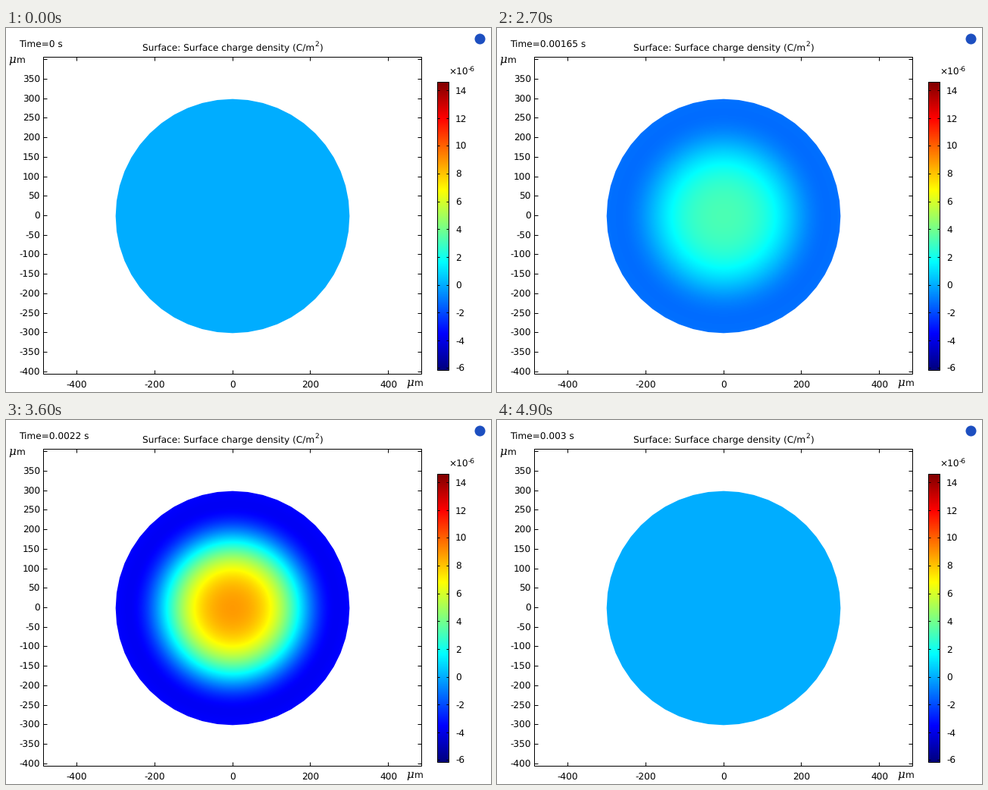
Animation of 640x480 px, one loop 5000 ms. Source, as a matplotlib script:

```python
import numpy as np
import matplotlib.pyplot as plt
from matplotlib.animation import FuncAnimation
from matplotlib.colors import LinearSegmentedColormap
from matplotlib.patches import Circle, Polygon, Rectangle

plt.rcParams.update({
    "toolbar": "None",
    "font.family": "DejaVu Sans",
    "text.hinting": "no_hinting",
})

W, H, DPI = 640, 480, 100
FRAMES, INTERVAL = 50, 100
PT = 72 / DPI

AXIS_X, AXIS_Y, SCALE = 299, 247.5, 0.5145   # origin and pixels per micrometre
DISC_X, DISC_Y, RADIUS = 299, 248, 300 * SCALE
LEFT, RIGHT, TOP, BOTTOM = 49.5, 548.5, 38.5, 456.5
BAR = (569.5, 71.5, 584.5, 451.5)
V_MIN, V_MAX = -6.14, 14.6

rainbow = LinearSegmentedColormap.from_list("rainbow", [
    (0, (0, 0, 0.5)), (0.125, (0, 0, 1)), (0.375, (0, 1, 1)),
    (0.625, (1, 1, 0)), (0.875, (1, 0, 0)), (1, (0.5, 0, 0))], N=512)

fig = plt.figure(figsize=(W / DPI, H / DPI), dpi=DPI, facecolor="white")
ax = fig.add_axes([0, 0, 1, 1])
ax.axis("off")


def label(x, y, text, size=12.1, ha="left", **style):
    return ax.text(x, y, text, fontsize=size * PT, ha=ha, va="baseline",
                   color="black", **style)


def line(x0, y0, x1, y1):
    ax.plot([x0, x1], [y0, y1], color="black", lw=PT, snap=False,
            solid_capstyle="butt")


def box(x0, y0, x1, y1):
    ax.add_patch(Rectangle((x0, y0), x1 - x0, y1 - y0, fill=False,
                           ec="black", lw=PT, snap=False, zorder=3))


def pixel_center(position):
    return np.floor(position) + 0.5


def micrometre(x, y):
    label(x, y, "μ", 15, family="DejaVu Serif", style="italic")
    label(x + 11, y, "m")


def draw_axes():
    box(LEFT, TOP, RIGHT, BOTTOM)
    for value in range(-400, 401, 50):
        y = pixel_center(AXIS_Y - value * SCALE)
        line(LEFT, y, LEFT + 5, y)
        line(RIGHT - 5, y, RIGHT, y)
        if value < 400:
            label(45, y + 4.5, str(value), ha="right")
    for value in range(-400, 401, 200):
        x = pixel_center(AXIS_X + value * SCALE)
        line(x, TOP, x, TOP + 5)
        line(x, BOTTOM - 5, x, BOTTOM)
        label(x, 475, str(value), ha="center")
    micrometre(3, 46)
    micrometre(528, 472)


def draw_color_bar():
    x0, y0, x1, y1 = BAR
    ax.imshow(np.linspace(1, 0, 380)[:, None], cmap=rainbow, vmin=0, vmax=1,
              extent=(x0, x1, y1, y0), aspect="auto", interpolation="nearest")
    box(*BAR)
    for value in range(-6, 15, 2):
        y = pixel_center(y1 - (value - V_MIN) / (V_MAX - V_MIN) * (y1 - y0))
        line(x0, y, x0 + 3, y)
        line(x1 - 3, y, x1, y)
        label(593, y + 4.5, str(value))
    label(584, 62, "×10")
    label(610, 57, "-6", 9)


def draw_title():
    label(180, 29, "Surface: Surface charge density (C/m")
    label(407, 24, "2", 9)
    label(413, 29, ")")


def charge_profile():
    """Positive core in a negative ring that eases off at the rim."""
    rho = np.array([0, 0.3, 0.4, 0.55, 0.73, 0.86, 0.9, 1])
    charge = [1, 0.81, 0.62, 0.225, -0.262, -0.418, -0.422, -0.405]
    curve = np.polyfit(rho ** 2, charge, 5)
    axis = (np.arange(-159, 159) + 0.5) / RADIUS
    x, y = np.meshgrid(axis, axis)
    return np.polyval(curve, np.minimum(x ** 2 + y ** 2, 1))


def time_text(step):
    """Time in seconds for a count of 10-microsecond steps."""
    if step == 0:
        value = "0"
    elif step < 10:
        value = f"{step}E-5"
    elif step < 100:
        value = f"{step / 10:g}E-4"
    else:
        value = f"{step / 1e5:g}"
    return f"Time={value} s"


draw_axes()
draw_color_bar()
draw_title()
ax.add_patch(Circle((625.5, 14.5), 7, fc="#1d4fc0", ec="none"))

profile = charge_profile()
surface = ax.imshow(profile * 0, cmap=rainbow, vmin=V_MIN, vmax=V_MAX,
                    extent=(DISC_X - 159, DISC_X + 159,
                            DISC_Y + 159, DISC_Y - 159),
                    aspect="auto", interpolation="nearest")
angles = np.linspace(0, 2 * np.pi, 48, endpoint=False)
outline = Polygon(np.c_[DISC_X + RADIUS * np.cos(angles),
                        DISC_Y + RADIUS * np.sin(angles)],
                  transform=ax.transData)
surface.set_clip_path(outline)
clock = label(17, 25, "")

ax.set_xlim(0, W)
ax.set_ylim(H, 0)


def update(frame):
    step = frame * 300 // (FRAMES - 1)
    pulse = 14.6 * np.exp(-0.5 * ((step - 200) / 20) ** 2)
    surface.set_data(pulse * profile)
    clock.set_text(time_text(step))
    return surface, clock


anim = FuncAnimation(fig, update, frames=FRAMES, interval=INTERVAL,
                     repeat=True, repeat_delay=0, blit=False)
plt.show()
```
